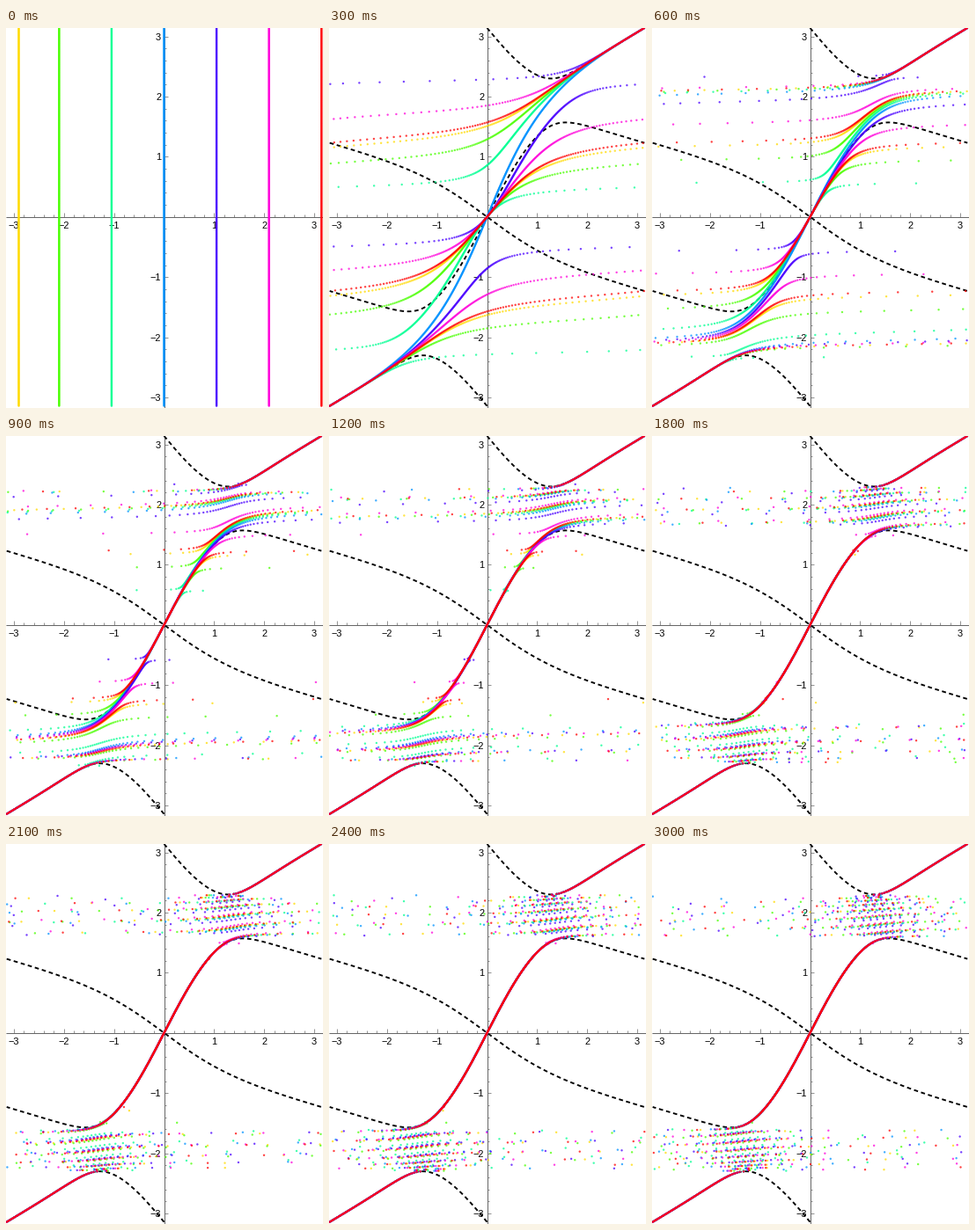
Animation, 360 px wide and 432 px high, one loop 3300 ms. Source, as a matplotlib script:

```python
import colorsys

import matplotlib.pyplot as plt
import numpy as np
from matplotlib.animation import FuncAnimation

W, H = 360, 432
STEPS, INTERVAL = 11, 300
CX, CY, SX, SY = 179.5, 214.8, 56.9, 68.4

fig = plt.figure(figsize=(W / 72, H / 72), dpi=72, facecolor="white")
ax = fig.add_axes([0, 0, 1, 1])
ax.set_xlim(0, W)
ax.set_ylim(H, 0)
ax.axis("off")


def px(x):
    return CX + SX * np.asarray(x)


def py(y):
    return CY - SY * np.asarray(y)


def draw_axes():
    style = dict(color="0.4", lw=1, zorder=1, solid_capstyle="butt")
    ax.plot([0, W], [CY, CY], **style)
    ax.plot([CX, CX], [0, H], **style)
    style["lw"] = 0.7
    for i in range(-15, 16):
        if i == 0:
            continue
        v, size = i / 5, 4.5 if i % 5 == 0 else 2.7
        ax.plot([px(v)] * 2, [CY, CY - size], **style)
        ax.plot([CX, CX + size], [py(v)] * 2, **style)
    font = dict(family="Liberation Sans", fontsize=11, color="black", zorder=1)
    for v in (-3, -2, -1, 1, 2, 3):
        text = str(v).replace("-", "\u2212")
        ax.text(px(v), CY + 9.7, text, ha="center", va="center_baseline", **font)
        ax.text(CX - 3.3, py(v), text, ha="right", va="center_baseline", **font)


def fixed_x(y, sign):
    """Fixed points of the map at height y, one branch per sign."""
    u = np.tan(y / 2)
    root = np.sqrt(np.maximum((u**2 - 1) * (u**2 - 5), 0))
    x = 2 * np.arctan2(2 * u, 1 + u**2 + sign * root)
    return (x + np.pi) % (2 * np.pi) - np.pi


def draw_fixed_curves():
    ease = np.sin(np.linspace(0, np.pi / 2, 300))
    fold, wrap = np.pi / 2, np.arccos(1 / 3)
    low = 1e-6 + (fold - 1e-6) * ease
    back = wrap + 1e-6 + (fold - wrap - 1e-6) * ease[::-1]
    arch = (np.r_[fixed_x(low, 1), fixed_x(back, -1)], np.r_[low, back])

    left = np.linspace(wrap - 1e-6, 1e-6, 300)
    x = fixed_x(left, -1)
    cross = (np.r_[x, -x[::-1]], np.r_[left, -left[::-1]])

    edge, top = 2 * np.arctan(np.sqrt(5)), np.pi - 1e-6
    high = top + (edge - top) * ease
    horn = (np.r_[fixed_x(high, 1), fixed_x(high[::-1], -1)],
            np.r_[high, high[::-1]])

    flip = lambda c: (-c[0], -c[1])
    return [ax.plot(px(c[0]), py(c[1]), color="black", lw=1.9, zorder=2,
                    dashes=(2.5, 1.9), dash_capstyle="butt")[0]
            for c in (arch, flip(arch), cross, horn, flip(horn))]


starts = [-2.9] + [k * np.pi / 3 for k in range(-2, 4)]
heights = -np.pi + 0.01 * np.arange(629)
X0, Y = (g.ravel() for g in np.meshgrid(starts, heights, indexing="ij"))
colors = np.repeat([(*colorsys.hsv_to_rgb(k / 7 % 1, 1, 1), 0.74)
                    for k in range(1, 8)], len(heights), axis=0)


def step(x):
    """Moebius map of the circle, with y as its parameter."""
    s, c = np.sin(x / 2), np.cos(x / 2)
    S, C = np.sin(Y / 2), np.cos(Y / 2)
    num = S * (C**2 - S**2) * s + S**2 * C * c
    den = C * (C**2 - 2 * S**2) * s + 2 * S * C**2 * c
    x = 2 * np.arctan2(num, den)
    return (x + np.pi) % (2 * np.pi) - np.pi


orbit = [X0]
for _ in range(STEPS - 1):
    orbit.append(step(orbit[-1]))

draw_axes()
curves = draw_fixed_curves()
dots = ax.scatter(px(X0), py(Y), s=2.4**2, c=colors, linewidths=0, zorder=3)


def update(i):
    dots.set_offsets(np.column_stack([px(orbit[i]), py(Y)]))
    for curve in curves:
        curve.set_visible(i > 0)
    return [dots, *curves]


anim = FuncAnimation(fig, update, frames=STEPS, interval=INTERVAL,
                     repeat=True, repeat_delay=0, blit=False)
plt.show()
```
